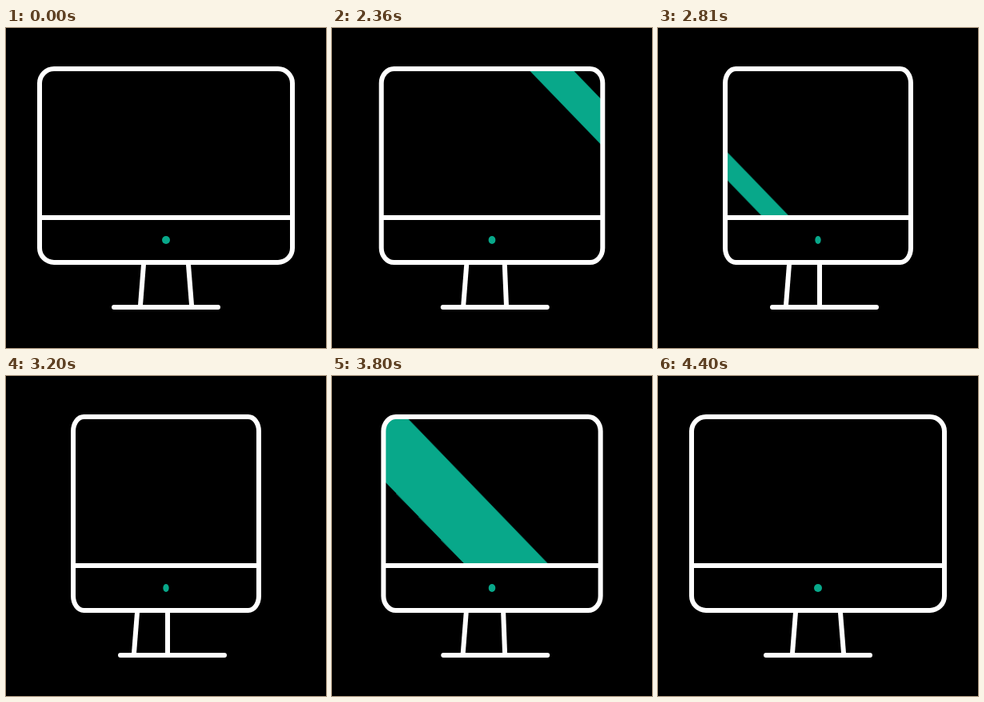
Animation of 400 by 400 pixels, one loop 4430 ms. Source, as an HTML page:

```html
<!DOCTYPE html>
<html lang="en">
<head>
<meta charset="utf-8">
<title>Turning monitor</title>
<style>
  /* 0 = facing front, 1 = fully turned */
  @property --turn {
    syntax: "<number>";
    inherits: true;
    initial-value: 0;
  }

  html, body {
    margin: 0;
    width: 100%;
    height: 100%;
    overflow: hidden;
    background: #000;
  }

  .stage {
    position: relative;
    width: 400px;
    height: 400px;
    overflow: hidden;
    animation: turn 4430ms linear infinite;
  }

  svg {
    position: absolute;
    inset: 0;
    width: 400px;
    height: 400px;
  }

  .glare {
    --x: calc(42px + 42px * var(--turn));
    --r: calc(18px - 5px * var(--turn));
    clip-path: inset(51px var(--x) 163px var(--x) round var(--r) var(--r) 0 0 / 18px 18px 0 0);
    fill: #08a88a;
  }
  .glare rect { transform: skewX(44deg); }
  .down { animation: down 4430ms linear infinite; }
  .up { animation: up 4430ms linear infinite; }

  .lines { fill: none; stroke: #fff; stroke-width: 6; }
  .lines * { vector-effect: non-scaling-stroke; }
  .screen {
    transform: translateX(200px) scaleX(calc(1 - .266 * var(--turn)));
  }
  .dot { fill: #08a88a; stroke: none; }
  .base {
    stroke-linecap: round;
    transform: translateX(calc(8px * var(--turn)));
  }
  .left {
    transform: translateX(calc(-8px * var(--turn)));
  }
  .right {
    transform: translate(calc(228px - 26px * var(--turn)), 296px)
      matrix(1, 0, calc(.08 - .08 * var(--turn)), 1, 0, 0);
  }

  @keyframes turn {
    0% { --turn: 0; }
    45.82% { --turn: 0; animation-timing-function: cubic-bezier(.48, 0, .37, 1); }
    63.21% { --turn: 1; }
    75.62% { --turn: 1; animation-timing-function: cubic-bezier(.48, 0, .37, 1); }
    99.32%, 100% { --turn: 0; }
  }

  @keyframes down {
    0% { transform: translateX(403px); }
    45.82% { transform: translateX(403px); animation-timing-function: cubic-bezier(.333, 0, .667, 1); }
    68.4% { transform: translateX(-299px); }
    68.41%, 100% { transform: translateX(-420px); }
  }

  @keyframes up {
    0%, 76.74% { transform: translateX(-420px); }
    76.75% { transform: translateX(-208px); animation-timing-function: cubic-bezier(.333, 0, .667, 1); }
    99.32%, 100% { transform: translateX(355px); }
  }
</style>
</head>
<body>
<div class="stage">
  <svg class="glare" viewBox="0 0 400 400">
    <g class="down">
      <rect x="-27.5" width="55" height="400"/>
      <rect x="115.5" width="34" height="400"/>
    </g>
    <g class="up">
      <rect x="-52.5" width="105" height="400"/>
    </g>
  </svg>
  <svg class="lines" viewBox="0 0 400 400">
    <path class="left" d="M172.2 293 L167.8 349"/>
    <path class="right" d="M0 -3 V53"/>
    <path class="base" d="M135 349 H265"/>
    <g class="screen">
      <rect x="-158" y="51" width="316" height="242" rx="18"/>
      <path d="M-158 237 H158"/>
      <circle class="dot" cy="265" r="5"/>
    </g>
  </svg>
</div>
</body>
</html>
```
